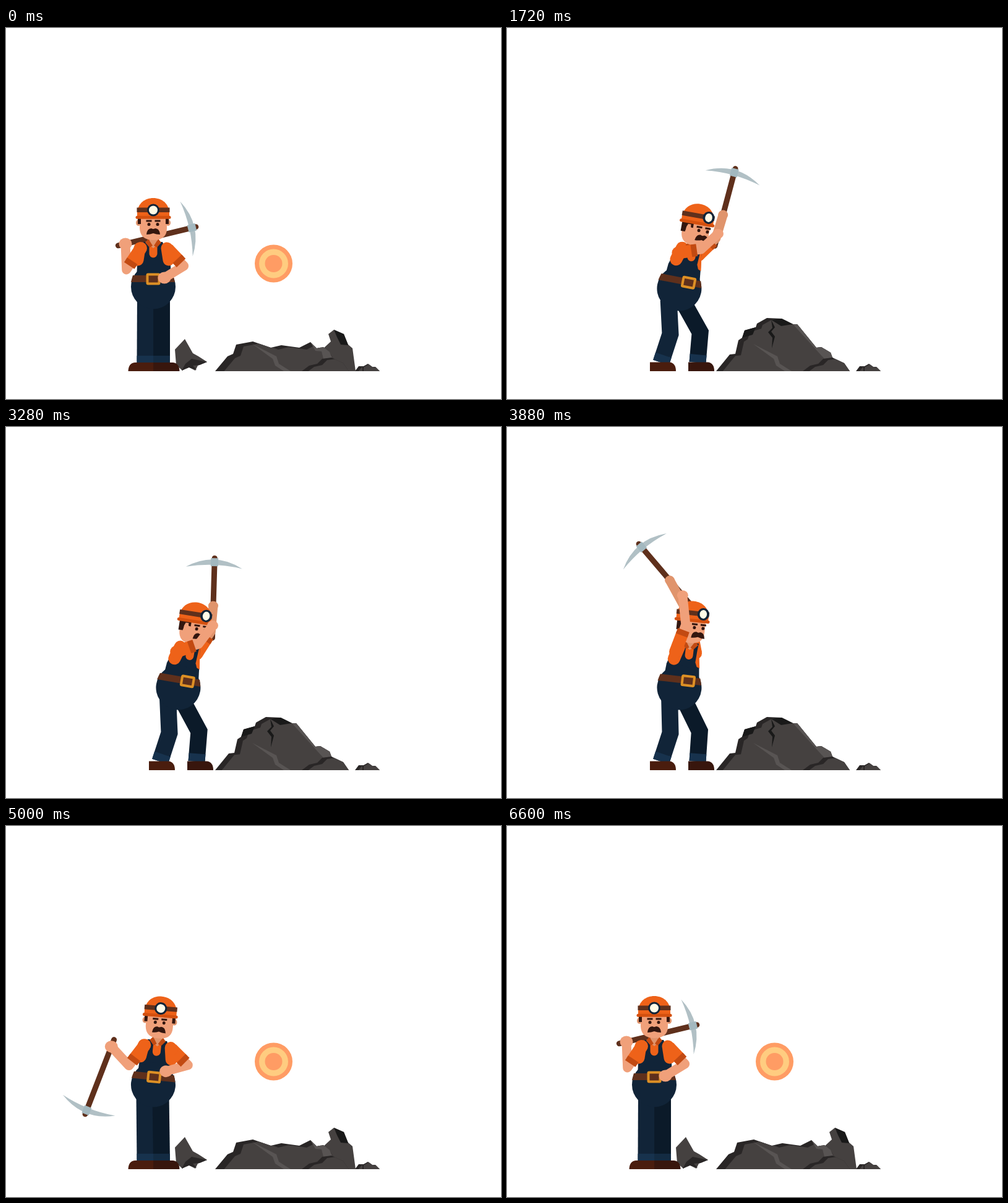
An HTML page for the animation above (7280 ms loop, 800x600 px).

```html
<!DOCTYPE html>
<html lang="en">
<head>
<meta charset="utf-8">
<title>Miner</title>
<style>
html, body { margin: 0; width: 100%; height: 100%; overflow: hidden; background: #fff; }
svg { display: block; width: 100vw; height: 100vh; }
</style>
</head>
<body>
<svg id="stage" viewBox="0 0 800 600"></svg>
<script>
// times in seconds
const LOOP = 7.28, FRAME = 0.04, CYCLE = 1.52, BACK = 0.64, HIT = 0.96, LIFT = 1.36;
const BREAK = 2 * CYCLE + HIT, TURN = 4.76, SHOULDERED = 6.12;
const C = {
  navy: '#112438', navyDark: '#0b1a29', cuff: '#17324d', cuffDark: '#132b42',
  orange: '#ee6219', rust: '#c24a12', brim: '#d4500f',
  skin: '#f0a07a', skinDark: '#e0946c', brown: '#5f301c', hair: '#33160f',
  gold: '#dd9025', shoe: '#4a1d0e', shoeDark: '#38160d', steel: '#b1c0c5', socket: '#a3b8bf',
  rock: '#454140', rockDark: '#292626', rockBlack: '#191919', rockLight: '#585453',
  coin: '#ff9c64', coinIn: '#ffcc80'
};

const rad = a => a * Math.PI / 180;
const clamp = v => Math.max(0, Math.min(1, v));
const span = (t, a, b) => clamp((t - a) / (b - a));
const mix = (a, b, k) => a + (b - a) * k;
const at = (p, q, k) => [mix(p[0], q[0], k), mix(p[1], q[1], k)];
const out3 = k => 1 - (1 - k) ** 3;
const both = k => k * k * (3 - 2 * k);
const hump = k => Math.sin(Math.PI * k);
const polar = (o, r, a) => [o[0] + r * Math.cos(rad(a)), o[1] + r * Math.sin(rad(a))];
const turn = (o, [x, y], a) => {
  const c = Math.cos(rad(a)), s = Math.sin(rad(a));
  return [o[0] + x * c - y * s, o[1] + x * s + y * c];
};
const rnd = i => { const v = Math.sin(i * 12.9898 + 4) * 43758.5453; return v - Math.floor(v); };

// shapes
const poly = (pts, fill) => `<polygon points="${pts}" fill="${fill}"/>`;
const path = (d, fill) => `<path d="${d}" fill="${fill}"/>`;
const rect = (x, y, w, h, fill) => `<rect x="${x}" y="${y}" width="${w}" height="${h}" fill="${fill}"/>`;
const oval = (x, y, rx, ry, fill) => `<ellipse cx="${x}" cy="${y}" rx="${rx}" ry="${ry}" fill="${fill}"/>`;
const dot = ([x, y], r, fill) => oval(x, y, r, r, fill);
const line = (pts, w, stroke, cap = 'butt', join = 'round') =>
  `<polyline points="${pts.join(' ')}" fill="none" stroke="${stroke}" stroke-width="${w}" stroke-linecap="${cap}" stroke-linejoin="${join}"/>`;
const group = ([x, y], a, body, size = 1) =>
  `<g transform="translate(${x} ${y}) rotate(${a}) scale(${size})">${body}</g>`;
const clip = (id, shape) => `<clipPath id="${id}">${shape}</clipPath>`;

// a stone whose left side lies in shade
const stone = (id, pts, shade) => clip(id, poly(pts)) + poly(pts, C.rockDark) +
  `<g clip-path="url(#${id})">${group([shade, shade / 4], 0, poly(pts, C.rock))}</g>`;

function pick(pos, a) {
  return group(pos, a,
    line([[-122, 0], [7, 0]], 9, C.brown, 'round') +
    path('M-8-46Q18 0-9 45Q1 0-8-46Z', C.steel) + rect(-6, -6, 13, 12, C.socket));
}

// joint between two points, set off sideways from their middle
function joint(s, h, off) {
  const dx = h[0] - s[0], dy = h[1] - s[1], d = Math.hypot(dx, dy);
  return [(s[0] + h[0]) / 2 - dy / d * off, (s[1] + h[1]) / 2 + dx / d * off];
}
const fold = (s, h, len) => -Math.sqrt(Math.max(9, len * len - ((h[0] - s[0]) ** 2 + (h[1] - s[1]) ** 2) / 4));

function arm(s, h, off, skin, grip) {
  const e = joint(s, h, off);
  const w = 4.5 / Math.hypot(e[0] - s[0], e[1] - s[1]), c = 0.7;
  return line([at(s, e, c), e, h], 15, skin, 'round') + oval(h[0], h[1], grip, grip - 1, skin) +
    line([s, at(s, e, c)], 20, C.orange) + dot(s, 10, C.orange) +
    line([at(s, e, c - w), at(s, e, c + w)], 20, C.rust);
}

function head(pos, a, front, shut) {
  const fx = front ? 0 : 12, lamp = front ? 0 : 17;
  let s = '';
  if (front) for (const k of [-1, 1]) s += oval(24 * k, 8, 4, 5, C.skinDark);
  s += path('M-22 0V17Q-21 36 0 36Q22 36 22 17V0Z', C.skin);
  if (front) for (const k of [-1, 1]) s += rect(22.5 * k - 2.5, 1, 5, 9, C.hair);
  else s += path('M-24 1H-5V8H-9V3H-14L-17 16H-24Z', C.hair) + oval(-12, 10, 4, 6, C.skin);
  for (const k of [-7, 7]) {
    s += rect(fx + k - 4.5, 3.5, 9, 3, C.hair);
    s += shut ? rect(fx + k - 3, 10, 6, 1.5, C.hair) : oval(fx + k, 10.5, 2.5, 2.6, C.hair);
  }
  s += group([fx, 0], 0, path('M-11 27Q-10 17-3 17Q0 19 3 17Q10 17 11 27Q5 27 0 25Q-5 27-11 27Z', C.hair));
  s += path('M-26-2V-8C-25-24-13-32 0-32S25-24 26-8V-2Z', C.orange) +
    rect(-26.5, -16.5, 53, 7.5, C.brown) + line([[-26, -0.8], [26, -0.8]], 5, C.brim, 'round') +
    oval(lamp, -12.5, front ? 10 : 9.5, 10, C.navy) + oval(lamp, -12.5, front ? 7 : 5.8, 7, '#fffbe8');
  return group(pos, a, s);
}

function torso(pos, a, front) {
  const cx = front ? 0 : 9.5, bx = front ? 0 : 13;
  let s = front
    ? poly('-27,-8 -26,-36 -16,-72 15,-72 28,-36 29,-8', C.navy)
    : poly('-27,-10 -25,-36 -14,-70 2,-74 23,-74 28,-36 31,-10', C.navy);
  if (front) for (const k of [-1, 1]) s += line([[25 * k, -43], [22 * k, -62]], 19, C.orange, 'round');
  else s += line([[-14, -45], [-8, -65]], 20, C.orange, 'round') + poly('23,-73 29,-34 24,-36 21,-43 22,-62', C.orange);
  s += line([[cx, -53], [cx, -71]], 13, C.orange, 'round') +
    poly([cx - 7, -78, cx + 7, -78, cx + 5, -66, cx, -62, cx - 5, -66], C.skinDark);
  for (const k of [-1, 1]) s += poly([cx + 8 * k, -77, cx + 13 * k, -71, cx + 6 * k, -63, cx + k, -66], C.rust);
  s += dot([0, 0.5], 36, C.navy) + path('M-33-18H32Q34-12 35-7H-36Q-35-12-33-18Z', C.brown) +
    `<rect x="${bx - 9.5}" y="-19.5" width="19" height="15" rx="1" fill="${C.brown}" stroke="${C.gold}" stroke-width="4"/>`;
  return group(pos, a, s);
}

function leg(hip, knee, foot, fill) {
  return line([hip, knee, foot], 27, fill, 'butt', 'miter') + line([at(foot, knee, 0.26), foot], 27, C.cuff);
}
const shoe = (x, fill) => path(`M${x} 540.5H${x + 32}Q${x + 42} 542 ${x + 42} 555H${x}Z`, fill);

// k: 0 with the pick drawn back, 1 on the rock; deep: extra reach of the last blow
function swing(t) {
  const n = Math.min(2, Math.floor((t + CYCLE - LIFT) / CYCLE)), p = t - n * CYCLE;
  const k = p < BACK ? 1 - both(span(p, LIFT - CYCLE, BACK - 0.02)) : span(p, BACK, HIT) ** 3.25;
  const deep = n === 2 && p > BACK ? 1 - both(span(p, LIFT, TURN - 2 * CYCLE)) : 0;
  return { k, deep, shut: p >= HIT && p < HIT + 0.14 };
}

function sideMiner(t) {
  const { k, deep, shut } = swing(t), o = [278.5, 421];
  const lean = -10 + (23 + 9 * deep) * out3(k);
  const bearing = 204 + (184 + 9 * deep) * k;
  const reach = 174 - 38 * hump(k) ** 3 + 36 * deep * k ** 3;
  const a = bearing - 15 - (12 - 6 * deep) * k;
  const tip = polar([285, 345], reach, bearing);
  const hand = d => polar(tip, -d, a);
  return pick(tip, a) + arm(turn(o, [20, -58], lean), hand(70), 10, C.skinDark, 8) +
    leg([290 - lean * 0.62, 440], [310 + lean * 0.2, 492], [308, 541], C.navyDark) +
    leg([265 - lean * 0.35, 440], [264, 495], [249, 541], C.navy) +
    shoe(231, C.shoe) + shoe(293, C.shoeDark) + torso(o, lean, false) +
    head(turn(o, [8, -110.5 + lean * 0.2], lean), lean * 0.93, false, shut) +
    arm(turn(o, [-13, -56], lean), hand(102), 11, C.skin, 9);
}

// the pick goes round in one sweep, from hanging down to lying on the shoulder
function frontMiner(t) {
  const o = [238, 418], k = span(t, TURN, SHOULDERED);
  const up = hump(k) - 0.1 * hump(span(t, SHOULDERED, 6.58));
  const lean = 11 * up, a = mix(90, 346.5, both(k));
  const hand = [mix(182, 193, k) - 26 * up, mix(400, 349, k) - 65 * up];
  const rest = at([256, 404], [261, 390], up);
  const left = turn(o, [-20, -62], lean), right = turn(o, [24, -60], lean);
  const top = 238 - 3 * up;
  return pick(polar(hand, 110, a), a) +
    poly([top - 26, 430, top + 4, 430, 242, 541, 211.5, 541], C.navy) +
    poly([top, 430, top + 27, 430, 265, 541, 238, 541], C.navyDark) +
    rect(211.5, 530, 26.5, 11, C.cuff) + rect(238, 530, 27, 11, C.cuffDark) +
    path('M238 541H208Q198 542 197.5 555H238Z', C.shoe) +
    path('M238 541H270Q280 542 280.5 555H238Z', C.shoeDark) +
    torso(o, lean, true) + head(turn(o, [0, -111], lean), lean * 0.85, true, false) +
    arm(right, rest, fold(right, rest, 37), C.skin, 10.5) +
    arm(left, hand, fold(left, hand, 42), C.skin, 10.5);
}

const pebbles = stone('pebbleA', '564,555 570,547 578,547 588,555', 5) +
  stone('pebbleB', '576,548 585,543 592,548 597,548 604,555 576,555', 2);
const details = poly('398,511 437,531 441,543 460,555 449,555 435,546 431,535', C.rockLight) +
  stone('corner', '478,555 490,546 503,543 511,535 526,533 545,542 554,555', 8);

function wholeRock(t) {
  let s = stone('whole', '338,555 360,528 369,527 374,505 380,501 384,489 402,484 404,478 420,469 444,470 462,479 469,479 500,517 508,516 523,525 526,533 554,555', 9) +
    poly('384,489 402,484 397,496 380,501', C.rockBlack) +
    poly('427,472 444,470 462,479 443,482', C.rockBlack) +
    poly('462,479 469,479 500,517 508,516 523,525 526,533 513,535', C.rockLight) + details;
  if (t >= HIT) s += poly('427,472 433,484 427,491 433,499 428,518 429,501 422,492 429,485', C.rockBlack);
  return s;
}

function brokenRock(t) {
  const e = out3(span(t, BREAK, BREAK + 0.6)), hop = -70 * hump(e);
  const chunk = poly('-9,-27 -25,-10 -23,15 -13,24 -4,18 8,24 12,16 27,10 13,1 4,-4', C.rock) +
    poly('-8,13 2,5 27,10 15,15 4,16 10,23 -2,19 -14,24', C.rockDark);
  const tower = poly('-29,-1 -16,-13 -20,-25 -11,-32 5,-25 12,-8 19,-2 24,35 -20,35', C.rock) +
    poly('-11,-32 5,-25 12,-7 0,-8 -6,-20', C.rockBlack);
  const land = (from, to) => [mix(from, to[0], e), mix(503, to[1], e) + hop];
  return group(land(420, [298, 530]), 360 * (1 - e), chunk) +
    group(land(455, [541, 520]), -50 * (1 - e), tower) +
    stone('broken', '338,555 358,531 367,527 372,512 399,507 428,517 445,513 474,517 492,508 502,518 513,516 525,528 530,536 554,555', 12) +
    poly('492,508 502,518 513,516 523,524 527,534 513,535 510,523 500,522', C.rockLight) + details;
}

function coin(t) {
  const k = span(t, BREAK, BREAK + 0.42) - 1;
  const rise = 1 + 2.2 * k ** 3 + 1.2 * k * k;
  const d = mix(-45, 45, out3(span(t, 5.2, 6.16)));
  const shine = group([0, 0], -45, rect(-45, d - 5, 90, 12, '#fff') + rect(-45, d - 12, 90, 4, '#fff'));
  return group([432.5, mix(490, 381, rise)], 0,
    dot([0, 0], 30.5, C.coin) + dot([0, 0], 23.5, C.coinIn) + dot([0, 0], 14, C.coin) +
    clip('disc', '<circle r="30.5"/>') + `<g clip-path="url(#disc)" opacity=".5">${shine}</g>`);
}

function debris(t) {
  const g = t - HIT - CYCLE * Math.min(2, Math.floor((t - HIT) / CYCLE));
  if (t < HIT || g > 0.64) return '';
  let s = '';
  for (let i = 0; i < 5; i++) {
    const reach = -160 + 92 * i, lift = 150 + 1000 * rnd(i);
    const x = 430 + reach * (1 - Math.exp(-4 * g));
    const y = Math.min(551, 472 - lift * g + (700 + 4.8 * lift) * g * g / 2);
    s += group([x, y], i * 75 + g * 420, poly('-4,-1 0,-2 4,0 1,2 -3,2', i % 2 ? C.rockBlack : C.rock), 0.8 + 0.5 * rnd(i + 9));
  }
  return s;
}

function scene(t) {
  const rocks = t < BREAK ? wholeRock(t) : coin(t) + brokenRock(t);
  return rocks + pebbles + (t < TURN ? sideMiner(t) : frontMiner(t)) + debris(t);
}

const stage = document.getElementById('stage');
const start = performance.now();
function draw(now) {
  const step = Math.floor(Math.max(0, now - start) / 1000 % LOOP / FRAME + 1e-6);
  // the loop opens on its closing pose
  stage.innerHTML = scene(step ? step * FRAME : LOOP);
  requestAnimationFrame(draw);
}
draw(start);
</script>
</body>
</html>
```
